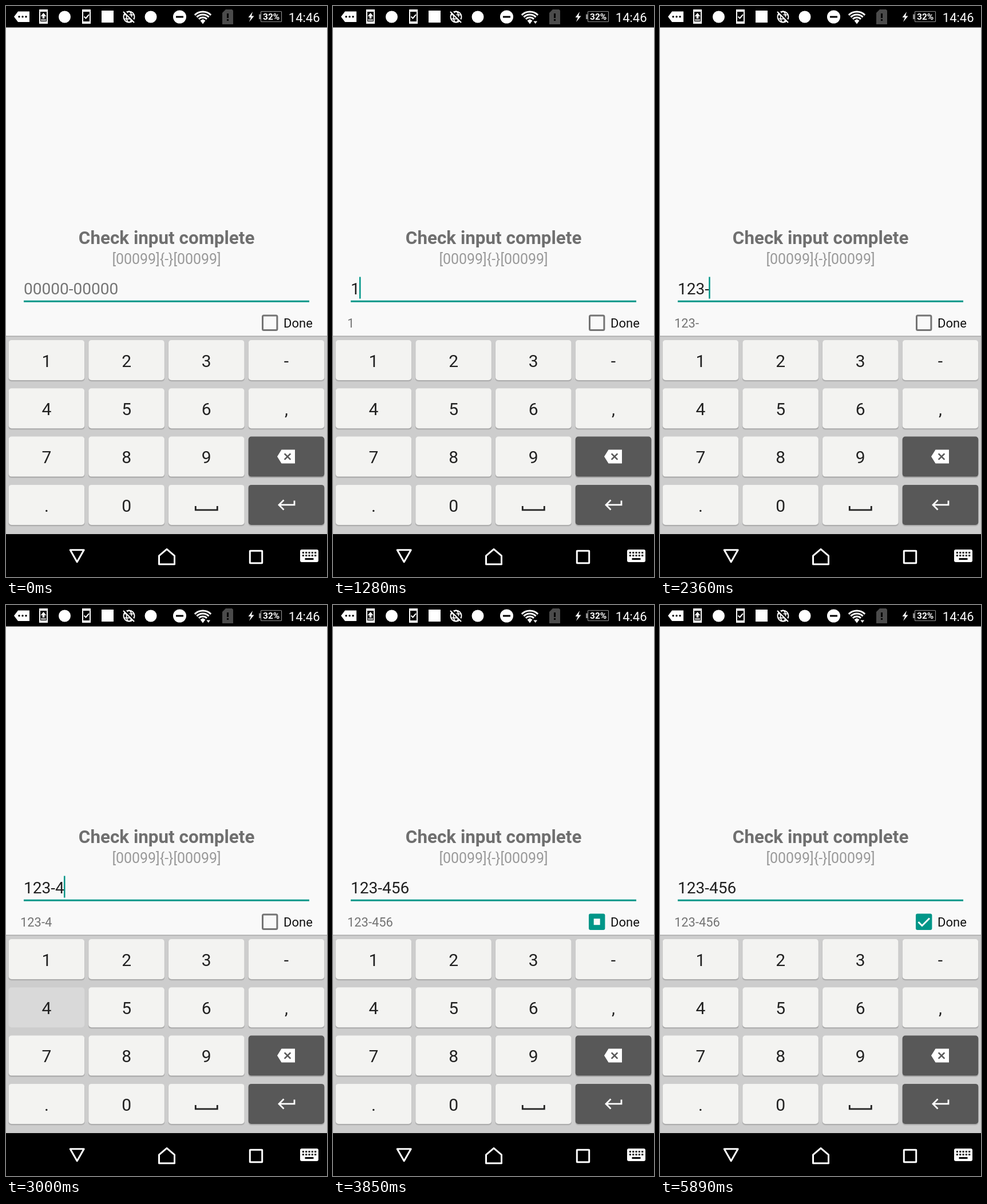
An HTML page with a canvas that plays this animation: 561x998 px, repeating every 6.32 s.

```html
<!DOCTYPE html>
<html lang="en">
<head>
<meta charset="utf-8">
<title>Check input complete</title>
<style>
html, body { margin: 0; width: 100%; height: 100%; overflow: hidden; background: #f9f9f9; }
canvas { display: block; width: 561px; height: 998px; }
</style>
</head>
<body>
<canvas id="stage"></canvas>
<script>
const W = 561, H = 998, LOOP = 6320;
const PAPER = '#f9f9f9', TEAL = '#009688', DARK = '#585858';
const INPUT = '123-456';
const KEYS = ['1', '2', '3', '-', '4', '5', '6', ',', '7', '8', '9', 'back', '.', '0', 'space', 'enter'];

// The screen refreshes in ticks; each tap holds its key for two ticks and types after one.
const TICK = 106.9, BLINK = 500 / TICK;
const TAPS = [10, 13, 15, 20, 27, 30, 34];

const canvas = document.getElementById('stage');
const ctx = canvas.getContext('2d');
const ratio = window.devicePixelRatio || 1;
canvas.width = W * ratio;
canvas.height = H * ratio;
ctx.scale(ratio, ratio);

function stateAt(time) {
  const tick = Math.floor((time + 5) / TICK);
  const typed = TAPS.filter(tap => tick > tap).length;
  const held = TAPS.findIndex(tap => tick >= tap && tick < tap + 2);
  // The last character fills the field and leaves the blink rhythm alone.
  const resets = Math.min(typed, TAPS.length - 1);
  const since = tick - 1 - (resets ? TAPS[resets - 1] : 0);
  return {
    typed,
    held: INPUT[held],
    cursor: since >= 0 && Math.floor(since / BLINK) % 2 === 0,
    checked: Math.min(1, Math.max(0, (tick - TAPS[TAPS.length - 1] - 1) / 4)),
    busy: tick >= TAPS[0] && (tick <= TAPS[3] || tick >= TAPS[4] - 1)
  };
}

function paint(color, line) {
  if (line) {
    ctx.strokeStyle = color;
    ctx.lineWidth = line;
    ctx.stroke();
  } else {
    ctx.fillStyle = color;
    ctx.fill();
  }
}

function rect(x, y, w, h, color) {
  ctx.fillStyle = color;
  ctx.fillRect(x, y, w, h);
}

function round(x, y, w, h, r, color, line) {
  ctx.beginPath();
  ctx.roundRect(x, y, w, h, r);
  paint(color, line);
}

function disc(x, y, r, color, line) {
  ctx.beginPath();
  ctx.arc(x, y, r, 0, Math.PI * 2);
  paint(color, line);
}

// SVG path data drawn at an offset; without a line width it is filled
function shape(x, y, data, color, line) {
  ctx.save();
  ctx.translate(x, y);
  const p = new Path2D(data);
  if (line) {
    ctx.strokeStyle = color;
    ctx.lineWidth = line;
    ctx.stroke(p);
  } else {
    ctx.fillStyle = color;
    ctx.fill(p);
  }
  ctx.restore();
}

function text(str, x, y, size, color, align = 'left', weight = 400) {
  ctx.font = `${weight} ${size}px Roboto, sans-serif`;
  ctx.textAlign = align;
  ctx.fillStyle = color;
  ctx.fillText(str, x, y);
}

function phone(x) {
  round(x, 7, 13, 23, 2, '#fff', 2);
  for (const y of [6, 27]) rect(x - 1, y, 15, 4, '#fff');
}

function globe(x, y) {
  disc(x, y, 9.5, '#fff', 2);
  ctx.beginPath();
  ctx.ellipse(x, y, 4.5, 9.5, 0, 0, Math.PI * 2);
  paint('#fff', 1.8);
  for (const dy of [-3.5, 3.5]) shape(x, y + dy, 'M-9 0H9', '#fff', 1.8);
  shape(x, y, 'M-9-11L11 9', '#000', 3);
  shape(x, y, 'M-10-9L9 10', '#fff', 2.2);
}

function wifi(x, busy) {
  for (let r = 10; r <= 20; r += 5) {
    ctx.beginPath();
    ctx.arc(x, 30, r, -Math.PI * 0.75, -Math.PI * 0.25);
    paint('#fff', 3);
  }
  shape(x, 31.5, 'M0 0L-4.5-6L0-8.5L4.5-6Z', '#fff');
  if (busy) {
    shape(x + 9.7, 26, 'M-5 0H5L0 6Z', '#000');
    shape(x + 9.7, 26.5, 'M-3.3 0H3.3L0 4.5Z', '#fff');
  }
}

function statusBar(busy) {
  rect(0, 0, W, 37.5, '#000');

  shape(14, 18.7, 'M0 0L7-9.3H27V9.3H7Z', '#fff');
  for (let i = 0; i < 3; i++) disc(23 + i * 6, 18.8, 1.7, '#000');

  phone(59);
  shape(65.5, 12, 'M0 0L5 6H1.8V10H-1.8V6H-5Z', '#fff');
  rect(61, 23.5, 9, 2, '#fff');
  disc(102.5, 19, 10.5, '#fff');
  phone(134);
  shape(139.5, 21.5, 'M-3-3L0 0L5.5-6.5', '#fff', 2);
  rect(167, 8, 21, 21, '#fff');
  globe(215, 19);
  disc(253, 19, 10.5, '#fff');

  disc(303.5, 19, 11.5, '#fff');
  rect(297, 17.5, 13, 3, '#000');
  wifi(344, busy);

  shape(378, 6, 'M6 0H17L19 2V26H0V6Z', '#4b4b4b');
  rect(386, 13, 3, 8, '#000');
  rect(386, 23, 3, 3, '#000');

  shape(431, 10, 'M0 0L-7.5 10H-3L-6 18L2.5 7.5H-2Z', '#fff');
  round(445.5, 9.5, 36, 18, 1, '#8c8c8c', 1.2);
  rect(442, 14.5, 3, 8.5, '#8c8c8c');
  text('32%', 463.7, 24.2, 15.5, '#fff', 'center', 700);
  text('14:46', 493.8, 27.5, 22, '#fff');
}

function checkbox(x, y, p) {
  if (!p) {
    round(x - 12.7, y - 12.7, 25.4, 25.4, 2, '#737373', 3);
    return;
  }
  round(x - 14.2, y - 14.2, 28.4, 28.4, 3, TEAL);
  const hole = 22 * Math.max(0, 1 - p * 2);
  rect(x - hole / 2, y - hole / 2, hole, hole, PAPER);
  // the tick is 19.5 wide and is revealed from left to right
  ctx.save();
  ctx.beginPath();
  ctx.rect(x - 12, y - 12, 24 * Math.max(0, p * 2 - 1), 24);
  ctx.clip();
  shape(x, y, 'M-9.7 .3L-3.2 6.8L9.8-6.2', '#fff', 3);
  ctx.restore();
}

function form({ typed, cursor, checked }) {
  const value = INPUT.slice(0, typed);
  text('Check input complete', 280.6, 416, 31.4, '#6f6f6f', 'center', 700);
  text('[00099]{-}[00099]', 280.6, 450.5, 24.93, '#999', 'center');
  text(value || '00000-00000', 31, 504, 28.05, value ? '#202020' : '#757575');
  rect(31, 514.7, 499, 3, TEAL);
  if (cursor) rect(30.2 + ctx.measureText(value).width, 473.5, 2.5, 38, TEAL);
  text(value, 25, 562.3, 21.9, '#737373');
  checkbox(461.2, 553.7, checked);
  text('Done', 485, 562.3, 22, '#111');
}

function key(name, col, row, held) {
  const w = 132.6, h = 70;
  const cx = 70.9 + col * 139.7, cy = 619 + row * 84.3;
  const x = cx - w / 2, y = cy - h / 2;
  const dark = name === 'back' || name === 'enter';
  if (!held) {
    round(x - 0.5, y + 1, w + 1, h + 1.5, 5, '#bababa');
    round(x, y + 1, w, h + 0.3, 5, '#a5a5a5');
  }
  round(x, y, w, h, 5, dark ? DARK : held ? '#d9d9d9' : '#f3f3f1');
  if (name === 'back') {
    shape(cx, cy, 'M-16 0L-8.5-12H15V12H-8.5Z', '#fff');
    shape(cx + 2, cy, 'M-5.3-5.3L5.3 5.3M5.3-5.3L-5.3 5.3', DARK, 2.6);
  } else if (name === 'enter') {
    shape(cx, cy, 'M14-7.5V0H-12M-4.5-8.5L-13 0L-4.5 8.5', '#fff', 2.8);
  } else if (name === 'space') {
    shape(cx, cy + 9, 'M-19-7V0H19V-7', '#222', 2.8);
  } else {
    text(name, cx, cy + 11.8, 30, '#212121', 'center');
  }
}

function keyboard(held) {
  rect(0, 577, W, 346, '#cdcdcd');
  rect(0, 576.5, W, 1.2, '#9c9c9c');
  KEYS.forEach((name, i) => key(name, i % 4, i >> 2, name === held));
}

function navBar() {
  rect(0, 923, W, 75, '#000');
  ctx.lineJoin = 'round';
  shape(124.2, 950.7, 'M-12 0H12L0 21Z', '#fff', 3);
  shape(281, 949.3, 'M0 0L13.5 11.5V26.5H-13.5V11.5Z', '#fff', 3);
  ctx.lineJoin = 'miter';
  round(426.3, 952.3, 21.4, 21.4, 0.5, '#fff', 3);
  round(514, 950, 32, 22, 3, '#fff');
  for (let i = 0; i < 10; i++) {
    rect(518 + (i % 5) * 5.3, 954 + (i > 4 ? 5 : 0), 3, 3, '#000');
  }
  rect(522.5, 965, 15, 3, '#000');
}

function draw(time) {
  const state = stateAt(time);
  rect(0, 0, W, H, PAPER);
  statusBar(state.busy);
  form(state);
  keyboard(state.held);
  navBar();
}

const start = performance.now();
function frame() {
  draw((performance.now() - start) % LOOP);
  requestAnimationFrame(frame);
}
frame();
</script>
</body>
</html>
```
